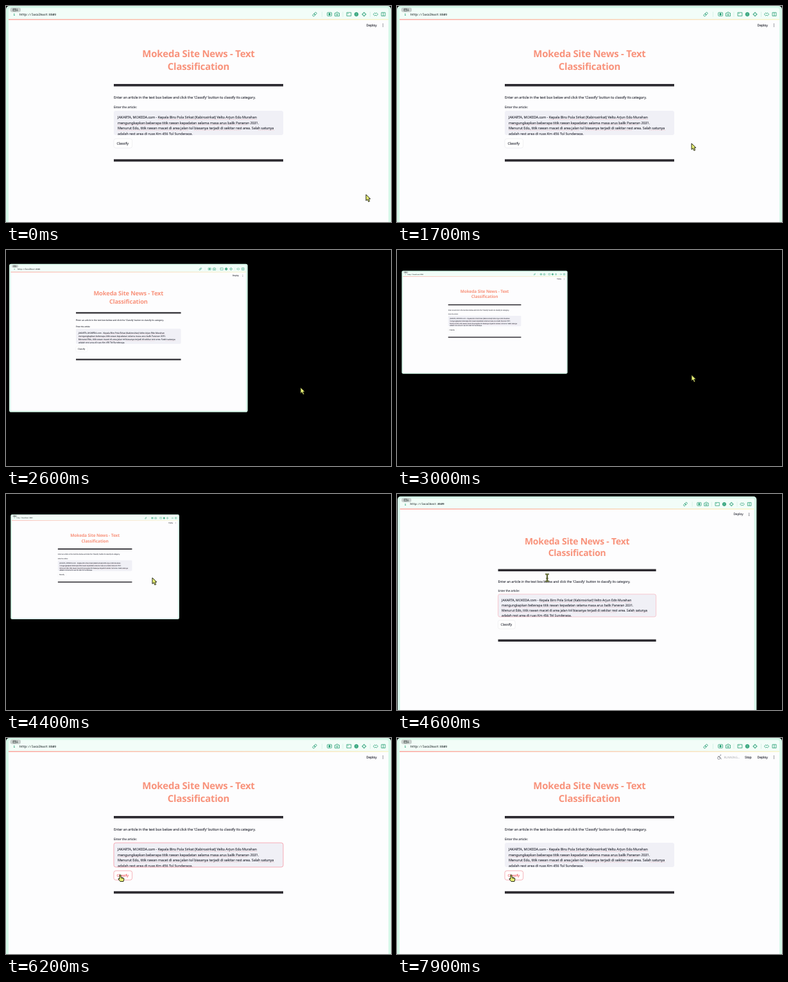
Write an HTML page that moves like this. It is 600 px wide and 338 px high and loops after 8 s.

```html
<!DOCTYPE html>
<html lang="en">
<head>
<meta charset="utf-8">
<title>Text classification demo</title>
<style>
  html, body { margin: 0; width: 100%; height: 100%; overflow: hidden; background: #000; }
  svg { display: block; width: 100%; height: 100%; }
  text { font-family: "Noto Sans", "Open Sans", sans-serif; font-size: 5.45px; letter-spacing: -.012em;
         fill: #2a2c37; stroke: #2a2c37; stroke-width: .1; text-rendering: geometricPrecision; }
  .title { font-size: 15px; font-weight: 700; letter-spacing: -.0173em; fill: #f8937c; stroke: none; text-anchor: middle; }
  .label { font-size: 4.77px; }
  .bar { font-size: 5.1px; }
  .mono { font-family: "Noto Sans Mono", "DejaVu Sans Mono", monospace; font-size: 4.52px; letter-spacing: 0; fill: #1d2b28; }
  .icons { fill: none; stroke: #16976a; stroke-width: .75; }
  .typos { stroke: #e2606f; stroke-width: .45; stroke-dasharray: .9 .6; opacity: .65; }
  .cursor { fill: #e6ee74; stroke: #16180c; stroke-width: .9; stroke-linejoin: round; }
</style>
</head>
<body>
<svg viewBox="0 0 600 338" preserveAspectRatio="none">
  <defs>
    <linearGradient id="glow">
      <stop offset="0" stop-color="#ff6a60"/>
      <stop offset="1" stop-color="#f6f0a8"/>
    </linearGradient>
    <clipPath id="box"><rect x="168" y="164" width="264" height="37.8" rx="3"/></clipPath>
  </defs>
  <rect width="600" height="338"/>

  <g id="window">
    <rect width="600" height="374.700" rx="5" fill="#d6f8e9"/>
    <rect x="4" y="3.5" width="592" height="368" rx="3" fill="#fdfdfe"/>
    <path d="M4 21V6.5a3 3 0 0 1 3-3H593a3 3 0 0 1 3 3V21Z" fill="#f2fdf8"/>
    <rect x="4" y="20.700" width="592" height=".9" fill="url(#glow)"/>

    <rect x="6.5" y="2.500" width="16.5" height="7" rx="3" fill="#c9d0ce"/>
    <path d="M11 4.300h4.500v3.600H11ZM11 5.700h4.500M17.500 4.200v3.600M16.300 6.700l1.200 1.200 1.200-1.200" fill="none" stroke="#4b5552" stroke-width=".7"/>
    <text class="mono" x="11.600" y="14.800" style="fill:#16976a;stroke:none;font-weight:700">i</text>
    <text class="mono" x="21" y="14.500" stroke="#1d2b28">http://localhost:8509</text>

    <g class="icons">
      <g transform="rotate(-45 481 13)">
        <rect x="477.300" y="11.500" width="4.200" height="3" rx="1.500"/>
        <rect x="480.500" y="11.500" width="4.200" height="3" rx="1.500"/>
      </g>
      <rect x="500.700" y="10.200" width="6.800" height="5.400" rx=".8"/>
      <circle cx="504.100" cy="12.900" r="1.300" fill="#16976a"/>
      <path d="M512.500 11h1.700l.7-1.200h2.200l.7 1.200h1.700v4.800h-7Z"/>
      <circle cx="516" cy="13.300" r="1.200"/>
      <path d="M531 10.200h6.800v5.400H531ZM532.200 12h1.600"/>
      <circle cx="546" cy="13" r="2.900" fill="#8fcfb6"/>
      <ellipse cx="546" cy="13" rx="1.300" ry="2.900"/>
      <path d="M543.100 13h5.800"/>
      <circle cx="558" cy="13" r="2.400"/>
      <path d="M558 9.400v2.300M558 14.300v2.300M554.400 13h2.300M559.300 13h2.300"/>
      <path d="M574.700 10.700 572.300 13l2.400 2.300 1.300-1.200 1.300 1.200 2.400-2.300-2.400-2.300-1.300 1.200Z"/>
      <path d="M585 10.200h6v5.400h-6ZM588 10.200v5.400"/>
      <path d="M492.500 9v8M525 9v8M567.500 9v8" stroke="#c5ebdc" stroke-width=".6"/>
    </g>

    <g id="running" opacity="0">
      <g fill="none" stroke="#8b8d95" stroke-width=".9">
        <circle cx="501.500" cy="31.300" r="2"/>
        <path id="arm" d="M503.800 27.600 502 30l2.400.8.800 2.600M502.700 29l-2.500-.4"/>
        <circle cx="504.300" cy="26.700" r=".5"/>
      </g>
      <text class="bar" x="509.500" y="31.700" style="font-size:4.600px;fill:#a9aab0;stroke:none">RUNNING...</text>
      <text class="bar" x="542" y="31.700">Stop</text>
    </g>
    <text class="bar" x="561.500" y="31.700">Deploy</text>
    <g fill="#31333f">
      <circle cx="587.500" cy="28" r=".6"/><circle cx="587.500" cy="30" r=".6"/><circle cx="587.500" cy="32" r=".6"/>
    </g>

    <text class="title" x="300" y="80.300">Mokeda Site News - Text</text>
    <text class="title" x="300" y="100.100">Classification</text>
    <path d="M168 123.800H432M168 241.700H432" stroke="#2d2b31" stroke-width="3.750"/>
    <text x="168" y="144.500">Enter an article in the text box below and click the 'Classify' button to classify its category.</text>
    <text class="label" x="168" y="159.600">Enter the article:</text>

    <rect x="168" y="164" width="264" height="38" rx="3" fill="#f0f0f6"/>
    <g clip-path="url(#box)">
      <text x="174" y="176.300">JAKARTA, MOKEDA.com - Kepala Biro Pola Sirkat (Kabirosirkat) Velto Arjun Edo Murahan</text>
      <text x="174" y="184.700">mengungkapkan beberapa titik rawan kepadatan selama masa arus balik Paneran 2031.</text>
      <text x="174" y="193.100">Menurut Edo, titik rawan macet di area jalan tol biasanya terjadi di sekitar rest area. Salah satunya</text>
      <text x="174" y="201.500">adalah rest area di ruas Km 456 Tol Sunderaga.</text>
      <path class="typos" d="M237 177.500H391M174 185.900H376M174 194.300H284M293 194.300H366M393 194.300H418"/>
    </g>
    <rect id="focus" x="168" y="164" width="264" height="38" rx="3" fill="none" stroke="#f58a98" stroke-width=".7" opacity="0"/>

    <rect id="button" x="168" y="207.800" width="28.600" height="14.400" rx="3" fill="#fff" stroke="#e6e6ea" stroke-width=".6"/>
    <text id="caption" x="172.400" y="216.800">Classify</text>
  </g>

  <g id="cursor" class="cursor">
    <path id="arrow" d="M0 0V9.600L2.200 7.600 3.900 11.300 5.700 10.500 4.100 6.900H7Z"/>
    <g id="beam" fill="none">
      <path d="M-2.800-5.500H-1Q0-5.500 0-4.300 0-5.500 1-5.500H2.800M0-4.500V4.500M-2.800 5.500H-1Q0 5.500 0 4.300 0 5.500 1 5.500H2.800M-1.500 1H1.500" stroke="#39401c" stroke-width="2"/>
      <path d="M-2.600-5.500H2.600M0-5V5M-2.600 5.500H2.600" stroke="#8d9a45" stroke-width=".7"/>
    </g>
    <path id="hand" d="M-1 1a1 1 0 0 1 2 0V4L4.400 4.800Q6.100 5.200 5.900 7L5 10.500H0L-2.900 7Q-3.300 5.700-2 5.800L-1 6.600ZM2.500 4.500V6M4.200 5V6.300"/>
  </g>
</svg>
<script>
const LOOP = 8000, STEP = 100;
const ZOOM_OUT = 2469, ZOOM_IN = 4390;
const MIN_SCALE = .43, STIFFNESS = 17.5, PIVOT = [13, 56.9];
const $ = id => document.getElementById(id);
const clamp = v => Math.min(1, Math.max(0, v));
const ramp = (t, from, to) => clamp((t - from) / (to - from));
const smooth = u => u * u * (3 - 2 * u);

// Pointer stops: time, x, y
const stops = [
  [1300, 561, 295], [1700, 459, 215], [2600, 459, 215], [3500, 459, 168],
  [3800, 459, 168], [4100, 228, 131], [4400, 228, 131], [4800, 240, 131],
  [5200, 240, 131], [6100, 187, 214], [6200, 178, 214]
];

function pointer(t) {
  const i = stops.findIndex(s => s[0] > t);
  if (i === 0) return stops[0].slice(1);
  if (i < 0) return stops[stops.length - 1].slice(1);
  const [a, b] = [stops[i - 1], stops[i]];
  const u = smooth(ramp(t, a[0], b[0]));
  return [a[1] + (b[1] - a[1]) * u, a[2] + (b[2] - a[2]) * u];
}

// Critically damped spring, 0 to 1
function spring(t, start) {
  const x = STIFFNESS * Math.max(0, t - start) / 1000;
  return 1 - (1 + x) * Math.exp(-x);
}

function shape(t, y) {
  if (t < 4500) return "arrow";
  if (y >= 207) return "hand";
  return y < 137 || (y > 164 && y < 203) ? "beam" : "arrow";
}

function render(t) {
  const out = spring(t, ZOOM_OUT) - spring(t, ZOOM_IN);
  const scale = 1 - (1 - MIN_SCALE) * out;
  const [px, py] = PIVOT;
  $("window").setAttribute("transform", `translate(${px * (1 - scale)} ${py * (1 - scale)}) scale(${scale})`);

  const [x, y] = pointer(t);
  const kind = shape(t, y);
  $("cursor").setAttribute("transform", `translate(${x} ${y})`);
  for (const id of ["arrow", "beam", "hand"]) $(id).style.display = id === kind ? "" : "none";

  const hover = kind === "hand";
  $("button").style.stroke = hover ? "#f0808a" : "";
  $("caption").style.fill = $("caption").style.stroke = hover ? "#f04a50" : "";
  $("focus").setAttribute("opacity", ramp(t, 4400, 4700) - ramp(t, 7300, 7500));
  $("running").setAttribute("opacity", ramp(t, 7300, 7500));
  $("arm").setAttribute("transform", `rotate(${t % 200 ? 0 : 8} 502 30)`);
}

function frame(now) {
  render(Math.floor(now % LOOP / STEP) * STEP);
  requestAnimationFrame(frame);
}
render(0);
requestAnimationFrame(frame);
</script>
</body>
</html>
```
